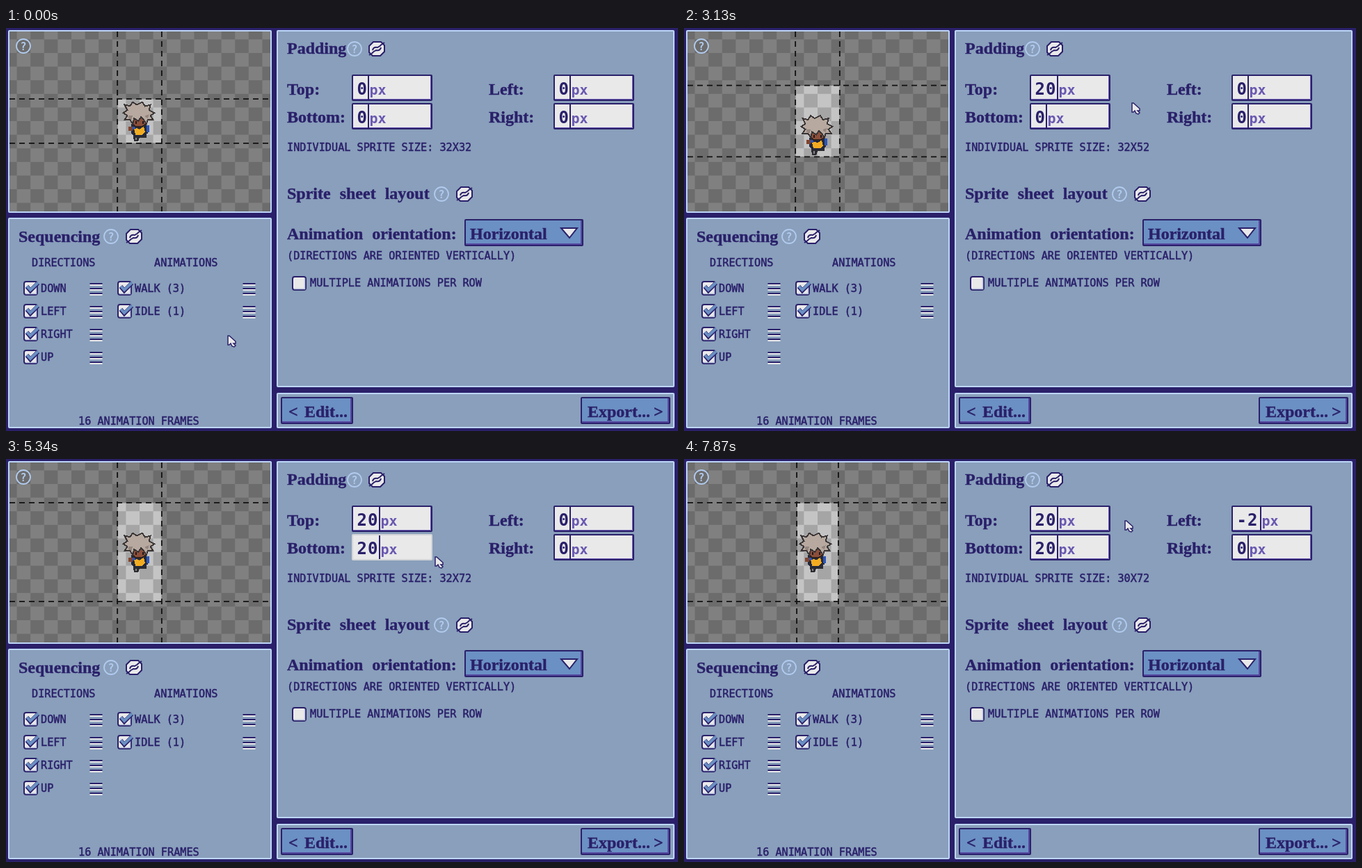
An HTML page for the animation above (7.99 s loop, 966 by 580 pixels).

```html
<!DOCTYPE html>
<html lang="en">
<head>
<meta charset="utf-8">
<title>Sprite sheet padding</title>
<style>
  html, body { margin: 0; width: 100%; height: 100%; overflow: hidden; background: #2a206a; }
  svg { display: block; width: 966px; height: 580px; }
  text { fill: #2a206a; white-space: pre; }
  .head { font: bold 24px "Liberation Serif", serif; word-spacing: 7px; stroke: #2a206a; stroke-width: .4; }
  .cap { font: 15.2px "DejaVu Sans Mono", monospace; stroke: #2a206a; stroke-width: .5; }
  .value { font: bold 24px "DejaVu Sans Mono", monospace; letter-spacing: 1px; }
  .unit { font: bold 20px "DejaVu Sans Mono", monospace; fill: #6a58b0; }
  .help { font: bold 15px "DejaVu Sans Mono", monospace; fill: #b1caee; text-anchor: middle; }
</style>
</head>
<body>
<svg id="stage" viewBox="0 0 966 580" xmlns="http://www.w3.org/2000/svg">
  <defs>
    <clipPath id="view"><rect x="5" y="5" width="375" height="259"/></clipPath>
  </defs>
</svg>
<script>
const NS = 'http://www.w3.org/2000/svg';
const svg = document.getElementById('stage');
const INK = '#2a206a', PANEL = '#899fbb', EDGE = '#bdd6f8', PAPER = '#e9e9ea', BLUE = '#6b90c3';
const LOOP = 7990, SCALE = 1.96, CX = 192, CY = 134;

function set(node, attrs) {
  for (const key in attrs) node.setAttribute(key, attrs[key]);
  return node;
}
function add(parent, tag, attrs, content) {
  const node = set(document.createElementNS(NS, tag), attrs);
  if (content !== undefined) node.textContent = content;
  return parent.appendChild(node);
}
const group = (parent, x = 0, y = 0) => add(parent, 'g', { transform: `translate(${x} ${y})` });
const rect = (parent, x, y, width, height, fill, more = {}) =>
  add(parent, 'rect', { x, y, width, height, fill, ...more });
const path = (parent, d, fill, stroke = 'none', width = 2) =>
  add(parent, 'path', { d, fill, stroke, 'stroke-width': width });
const label = (x, y, cls, content, parent = svg) => add(parent, 'text', { x, y, class: cls }, content);

function panel(x, y, w, h) {
  rect(svg, x, y, w, h, PANEL, { stroke: EDGE, 'stroke-width': 2, rx: 1 });
}
function help(x, y) {
  add(svg, 'circle', { cx: x, cy: y, r: 10, fill: 'none', stroke: '#b1caee', 'stroke-width': 1.8 });
  label(x, y + 5.5, 'help', '?');
}
function reset(x, y) {
  const g = group(svg, x, y);
  path(g, 'M-5 -10H6L11 -5V4L5 10H-6L-11 5V-4Z', PAPER, INK, 2);
  path(g, 'M-11 9L-5 5M11 -9L5 -5M-6 2Q-5 -3 1 -2L6 -5M6 -2Q5 3 -1 2L-6 5', 'none', INK, 2);
}
function checkbox(x, y, on) {
  const g = group(svg, x, y);
  rect(g, 1, 1, 19, 19, PAPER, { stroke: INK, 'stroke-width': 2, rx: 3 });
  path(g, 'M3 18.500H18.500V3', 'none', '#b9c4dc', 1.500);
  if (on) {
    path(g, 'M5 8L10 14L21 3', 'none', INK, 6);
    path(g, 'M5 7.500L10 13L21 2.500', 'none', BLUE, 4);
  }
}
function handle(x, y) {
  for (let i = 0; i < 3; i++) {
    rect(svg, x, y + 7 * i, 18, 2, INK);
    rect(svg, x, y + 7 * i + 2, 18, 2, PAPER);
  }
}
function button(x, y, w, h) {
  rect(svg, x, y, w, h, INK, { rx: 2 });
  rect(svg, x + 2, y + 2, w - 4, h - 4, BLUE);
  path(svg, `M${x + 2} ${y + h - 3}H${x + w - 3}V${y + 2}`, 'none', '#5548a0', 2);
}

// Preview
function checker(id, light, dark) {
  const size = 10 * SCALE;
  const p = add(svg.querySelector('defs'), 'pattern', {
    id, x: CX, y: CY, width: 2 * size, height: 2 * size, patternUnits: 'userSpaceOnUse'
  });
  rect(p, 0, 0, 2 * size, 2 * size, dark);
  rect(p, 0, 0, size, size, light);
  rect(p, size, size, size, size, light);
}
checker('dim', '#808080', '#6c6c6c');
checker('lit', '#c4c4c4', '#a5a5a5');

panel(4, 4, 377, 261);
const view = add(svg, 'g', { 'clip-path': 'url(#view)' });
rect(view, 5, 5, 375, 259, 'url(#dim)');
const lit = rect(view, 0, 0, 0, 0, 'url(#lit)');
const sprite = add(view, 'g', { 'shape-rendering': 'crispEdges' });
drawSprite(sprite);
const guides = add(view, 'path', {
  fill: 'none', stroke: '#111', 'stroke-width': 1.8, 'stroke-dasharray': '8 6'
});
help(25, 26);

function drawSprite(g) {
  path(g, 'M11 25H21V28H16L15 31H12Z', '#2b2b30');
  rect(g, 13, 28, 1, 2, '#85858a');
  path(g, 'M10 18H20L23 20L22 25L19 27H12L10 25Z', '#22283c');
  rect(g, 8, 20, 3, 3, '#80452f');
  rect(g, 21, 19, 2, 5, '#2d55b4');
  rect(g, 11, 20, 2, 2, '#2d55b4');
  path(g, 'M12 22L14 21L16 22L19 20L20 24L18 26H13Z', '#f3ac21');
  path(g, 'M11 13H21V18L18 20H13L11 18Z', '#8c4f3a', '#30231f', 1);
  rect(g, 13, 16, 1, 2, '#21191c');
  rect(g, 18, 16, 1, 2, '#21191c');
  path(g, 'M4 10L7 8L5 4L9 5L11 2L14 4L18 2L20 5L24 4L23 8L27 10L24 12L26 15L22 15' +
    'L21 18L19 15L17 13L15 16L12 14L11 18L9 15L5 15L7 12Z', '#b7a99f', '#3a3536', 1);
  path(g, 'M8 12L11 12L10 15L8 14ZM20 12L23 11L22 14L20 13Z', '#94867f');
}

// Sequencing
panel(4, 274, 377, 301);
label(18, 308, 'head', 'Sequencing');
help(151, 300);
reset(184, 300);
label(37, 343, 'cap', 'DIRECTIONS');
label(213, 343, 'cap', 'ANIMATIONS');
['DOWN', 'LEFT', 'RIGHT', 'UP'].forEach((name, i) => {
  const y = 364 + 33 * i;
  checkbox(25, y, true);
  label(50, y + 16, 'cap', name);
  handle(120.5, y + 3);
});
['WALK (3)', 'IDLE (1)'].forEach((name, i) => {
  const y = 364 + 33 * i;
  checkbox(160, y, true);
  label(185, y + 16, 'cap', name);
  handle(340.5, y + 3);
});
label(104, 571, 'cap', '16 ANIMATION FRAMES');

// Settings
panel(390, 4, 570, 512);
label(404, 37, 'head', 'Padding');
help(501, 30);
reset(533, 30);
label(404, 96, 'head', 'Top:');
label(404, 136, 'head', 'Bottom:');
label(694, 96, 'head', 'Left:');
label(694, 136, 'head', 'Right:');
const sizeText = label(404, 177, 'cap', '');
label(404, 246, 'head', 'Sprite sheet layout');
help(626, 239);
reset(659, 239);
label(404, 304, 'head', 'Animation orientation:');
button(659, 275, 171, 39);
label(667, 304, 'head', 'Horizontal');
path(svg, 'M798 288H821L810 302Z', PAPER, INK, 2);
label(404, 333, 'cap', '(DIRECTIONS ARE ORIENTED VERTICALLY)');
checkbox(411, 357, false);
label(437, 372, 'cap', 'MULTIPLE ANIMATIONS PER ROW');

panel(390, 526, 570, 49);
button(395, 531, 104, 39);
label(406, 560, 'head', '<');
label(429, 560, 'head', 'Edit...');
button(826, 531, 129, 39);
label(836, 560, 'head', 'Export...');
label(931, 560, 'head', '>');

function makeField(x, y, keys, focus) {
  const g = group(svg, x, y);
  return {
    x, y, keys, focus,
    frame: rect(g, 0, 0, 116, 38, INK, { rx: 2 }),
    fill: rect(g, 2, 2, 112, 34, PAPER),
    shade: path(g, 'M2 35.500H113.500V2', 'none', '#6a58b0', 1),
    mark: rect(g, 7, 3, 16, 32, '#b3b2f3'),
    value: label(7.500, 28.500, 'value', '', g),
    caret: rect(g, 0, 2, 2, 34, INK),
    unit: label(0, 29, 'unit', 'px', g)
  };
}
const fields = [
  makeField(497, 67, [[0, '0'], [2260, '20']], [940, 2630]),
  makeField(497, 108, [[0, '0'], [4350, '2'], [4470, '20']], [3720, 4720]),
  makeField(787, 67, [[0, '0'], [6770, '-2']], [6040, 7020]),
  makeField(787, 108, [[0, '0']], [-1, -1])
];

const arrow = group(svg);
path(arrow, 'M0 0L2 0L11 8V11H8L11 14L9 16L6 15L4 11L2 13H0Z', PAPER, INK, 1.500);
const beam = group(svg);
path(beam, 'M-5 -9H-2L0 -7L2 -9H5M0 -7V7M-5 9H-2L0 7L2 9H5', 'none', '#181820', 1.800);

// Pointer moves: start time, steps, end x, end y
const STEP = 118;
const moves = [
  [120, 7, 528, 76], [1160, 1, 530, 78], [1280, 1, 533, 78], [1650, 1, 533, 85],
  [3130, 1, 644, 108], [3250, 3, 570, 127], [3840, 1, 577, 127],
  [5340, 1, 617, 141], [5460, 6, 829, 80], [6160, 1, 840, 85], [7750, 2, 634, 89]
];
function pointerAt(t) {
  let x = 319, y = 443;
  for (const [start, steps, toX, toY] of moves) {
    if (t < start) break;
    const k = Math.min(1, (Math.floor((t - start) / STEP) + 1) / steps);
    const e = k * k * (3 - 2 * k);
    x += (toX - x) * e;
    y += (toY - y) * e;
  }
  return { x, y };
}
const over = (f, p, pad) =>
  p.x > f.x - pad && p.x < f.x + 116 + pad && p.y > f.y && p.y < f.y + 38;

function drawField(f, t, p) {
  const value = f.keys.filter(([at]) => t >= at).pop()[1];
  const focused = t >= f.focus[0] && t < f.focus[1];
  const picked = focused && value === '0';
  const hover = over(f, p, 5);
  const caret = 7 + 16 * value.length + (value[0] === '-' ? 2 : 0);
  set(f.frame, { fill: focused ? '#2828e0' : hover ? '#d3d5d8' : INK });
  set(f.shade, { opacity: focused || hover ? 0 : 1 });
  set(f.mark, { opacity: picked ? 1 : 0 });
  set(f.caret, { x: caret });
  set(f.unit, { x: caret + 2.5 });
  f.value.style.fill = picked ? '#594fc0' : INK;
  f.value.textContent = value;
  return Number(value);
}

function render(t) {
  const p = pointerAt(t);
  const [padT, padB, padL, padR] = fields.map(f => drawField(f, t, p));
  const cols = 32 + padL + padR, rows = 32 + padT + padB;
  const w = cols * SCALE, h = rows * SCALE;
  const x = CX - w / 2, y = CY - h / 2;
  set(lit, { x, y, width: w, height: h });
  set(sprite, {
    transform: `translate(${x + padL * SCALE} ${y + padT * SCALE}) scale(${SCALE})`
  });
  set(guides, {
    d: `M${x - .5} 5V264M${x + w + .5} 5V264M5 ${y - .5}H380M5 ${y + h + .5}H380`
  });
  sizeText.textContent = `INDIVIDUAL SPRITE SIZE: ${cols}X${rows}`;

  const typing = fields.some(f => over(f, p, 0));
  const transform = `translate(${p.x} ${p.y})`;
  set(arrow, { transform, visibility: typing ? 'hidden' : 'visible' });
  set(beam, { transform, visibility: typing ? 'visible' : 'hidden' });
}

const began = performance.now();
function tick() {
  render((performance.now() - began) % LOOP);
  requestAnimationFrame(tick);
}
render(0);
requestAnimationFrame(tick);
</script>
</body>
</html>
```
